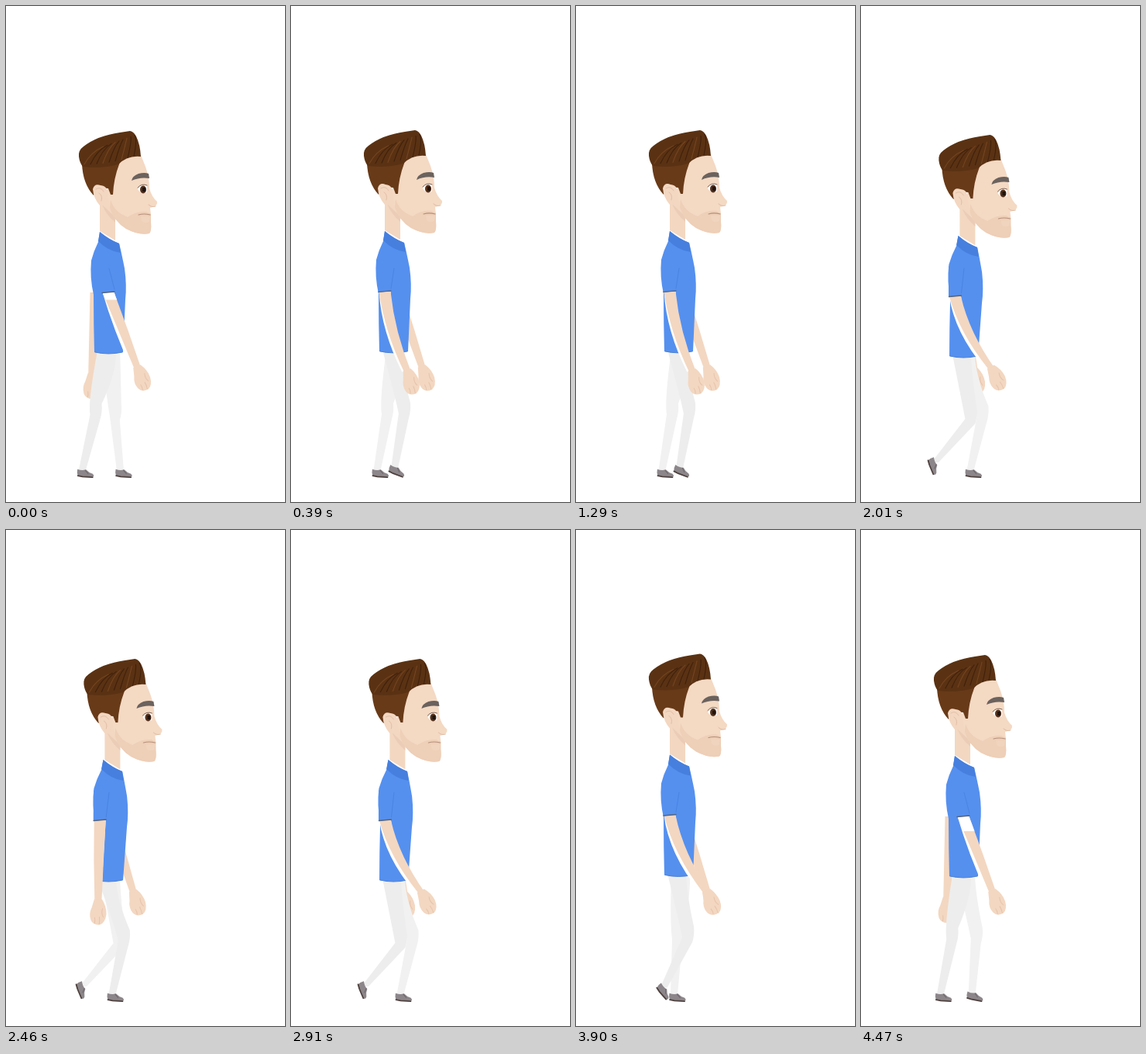
These frames come from a looping animation (360 by 639 pixels, 4500 ms). An HTML page with a canvas:

```html
<!DOCTYPE html>
<html lang="en">
<head>
<meta charset="utf-8">
<title>Walk cycle</title>
<style>
html, body { margin: 0; width: 100%; height: 100%; overflow: hidden; background: #fff; }
canvas { display: block; }
</style>
</head>
<body>
<canvas id="stage" width="360" height="639"></canvas>
<script>
const ctx = document.getElementById('stage').getContext('2d');
const STEP = 30, CYCLE = 900, HALF = CYCLE / 2;
const SKIN = '#f3d7c1', BLUE = '#5590ef', DARK_BLUE = '#467fde';

const mod = (t, period) => ((t % period) + period) % period;
const clamp = u => Math.min(1, Math.max(0, u));
const ease = u => (u = clamp(u), u * u * (3 - 2 * u));
const hump = u => Math.sin(Math.PI * clamp(u));

// Eases 0 to 1 between rise and top, and back to 0 between leave and end.
function pulse(t, period, rise, top, leave, end) {
  const s = mod(t - rise, period);
  return ease(s / (top - rise)) - ease((s - leave + rise) / (end - leave));
}

function bodyPose(t) {
  const lean = pulse(t, HALF, 0, 150, 215, 295);
  return { lean, bob: 5 * lean - 2 * hump((mod(t, HALF) - 255) / 165) };
}

// The foot rolls back on the ground, then lifts and swings forward.
function footPose(t) {
  const s = mod(t - 65, CYCLE), ground = 515;
  const turn = s < ground ? s / ground : 1 + (s - ground) / (CYCLE - ground);
  const swing = (mod(t, CYCLE) - 460) / 430;
  return {
    x: 122.5 + 29 * Math.cos(Math.PI * turn),
    y: 598 - 11 * hump(swing),
    angle: 3 + 66 * hump(clamp(swing) ** .7)
  };
}

function nearArmPose(t, bob) {
  const swing = pulse(t, CYCLE, 610, 860, 1190, 1450);
  const sleeve = pulse(t, CYCLE, 640, 880, 900, 1140);
  return {
    cx: 121 + 11 * sleeve, cy: 369 + bob,
    hx: 112 + 63 * swing, hy: 494 - 14 * swing,
    bow: 13 * swing * (1 - sleeve), gap: 4 * swing,
    bare: 48 * pulse(t, CYCLE, 680, 740, 750, 960)
  };
}

function farArmPose(t, bob) {
  const swing = pulse(t, CYCLE, 90, 300, 620, 850);
  return {
    cx: 116 + 20 * swing, cy: 369 + bob,
    hx: 110 + 64 * swing, hy: 490 - 10 * swing, bow: 0
  };
}

function fill(color, path) {
  ctx.fillStyle = color;
  ctx.fill(new Path2D(path));
}
function line(color, width, path) {
  ctx.strokeStyle = color;
  ctx.lineWidth = width;
  ctx.lineCap = 'round';
  ctx.stroke(new Path2D(path));
}
function placed(x, y, angle, draw) {
  ctx.save();
  ctx.translate(x, y);
  ctx.rotate(angle);
  draw();
  ctx.restore();
}

function shoe({ x, y, angle }) {
  placed(x, y, angle * Math.PI / 180, () => {
    fill('#8c868a', 'M-6 -1Q0 1 5 -1Q9 3 14 4Q17 7 14 8L-5 8Q-7 4 -6 -1Z');
    line('#4d403d', 1.8, 'M-5 7.5L1 8.3L14 8.4');
    line('#6c6469', 1, 'M4 0L8 4');
  });
}

// Two bones from hip to ankle, with the knee bent forward.
function leg(hipX, hipY, ankle, color) {
  const thigh = 68, shin = 78, { x, y } = ankle;
  const dx = x - hipX, dy = y - hipY;
  const d = Math.min(Math.hypot(dx, dy), thigh + shin);
  const bend = Math.acos((thigh * thigh + d * d - shin * shin) / (2 * thigh * d));
  const a = Math.atan2(dy, dx) - bend;
  const kx = hipX + thigh * Math.cos(a), ky = hipY + thigh * Math.sin(a);
  fill(color, `M${hipX - 12} ${hipY - 8}L${hipX + 12} ${hipY - 8}
    Q${hipX + 13} ${hipY + 20} ${kx + 8} ${ky - 6}Q${kx + 9} ${ky + 4} ${kx + 6} ${ky + 14}
    L${x + 4.5} ${y + 1}L${x - 4.5} ${y + 1}L${kx - 7} ${ky + 8}
    Q${kx - 10} ${ky - 8} ${hipX - 12} ${hipY - 8}Z`);
  shoe(ankle);
}

const armAngle = ({ cx, cy, hx, hy }) => Math.atan2(hy - cy, hx - cx);

function armPath(arm, shift = 0) {
  const { cx, cy, hx, hy, bow } = arm, a = armAngle(arm);
  const wx = hx - 14 * Math.cos(a) - shift, wy = hy - 14 * Math.sin(a);
  const mx = (cx + wx) / 2 - bow - shift, my = (cy + wy) / 2;
  return `M${cx - 7.5} ${cy}Q${mx - 6} ${my} ${wx - 4.5} ${wy}L${wx + 4.5} ${wy}
    Q${mx + 7} ${my} ${cx + 7.5} ${cy}Z`;
}

function drawArm(arm) {
  fill(SKIN, armPath(arm));
  placed(arm.hx, arm.hy, armAngle(arm) - Math.PI / 2, () => {
    fill(SKIN, 'M-5 -17L5 -17Q11 -8 11 2Q10 13 3 16Q-6 17 -9 10Q-12 2 -8 -6Z');
    line('#e5c3ab', 1, 'M-4 7Q-3 11 -4 14M2 6Q3 11 2 15M6 -5Q4 1 7 6');
  });
}

function drawNearArm(arm) {
  const { cx, cy, bare } = arm;
  fill('#fff', armPath(arm, arm.gap));
  drawArm(arm);
  ctx.save();
  ctx.beginPath();
  ctx.rect(0, cy, 360, bare);
  ctx.clip();
  fill('#fff', armPath(arm));
  ctx.restore();
  fill(BLUE, `M113 336Q123 322 133 336L${cx + 8.5} ${cy - 1}L${cx - 8.5} ${cy + 1}Z`);
  line('#53647f', 1.3, `M${cx - 8} ${cy + .5}L${cx + 8} ${cy - 1}`);
  line('#4a84e2', 1, `M133 338L${cx + 8} ${cy - 4}`);
}

function torso({ lean, bob }) {
  const k = lean * 4.3 / 150;
  ctx.save();
  ctx.transform(1, 0, -k, 1, 447 * k, bob);
  fill('#fff', 'M121 290L141 302L147 307L122 298Z');
  fill(BLUE, `M121 291Q133 301 146 306Q149 318 153 338Q156 360 154 378L151 446
    Q132 450 114 446Q113 410 113 372Q108 350 110 328Q113 316 119 304Z`);
  fill(DARK_BLUE, 'M121 291Q133 301 146 306L148 318Q132 316 119 303Z');
  line('#4d7fd0', 1, 'M115 446Q132 450 150 446');
  ctx.restore();
}

function hair() {
  fill('#683a18', 'M98 203Q99 229 113 244L119 234L132 235L135 243L138 243Q139 222 146 204L148 198L100 198Z');
  fill('#5a3213', `M94 194Q93 186 100 181Q118 167 147 163L160 161Q165 162 168 168
    Q173 178 174 194Q157 192 145 204Q124 210 99 207Q95 202 94 194Z`);
  for (let i = 0; i < 9; i++) {
    const x = 101 + 8 * i, root = 204 - .17 * i * i;
    const tipX = 126 + 5 * i, tipY = 181 - 1.8 * i;
    line(i % 3 ? '#40200c' : '#754520', 1.1,
      `M${x} ${root}Q${(x + tipX) / 2 + i - 4} ${tipY + 7} ${tipX} ${tipY}`);
  }
}

function head({ lean, bob }) {
  ctx.save();
  ctx.translate(6.4 * lean, bob);
  fill(SKIN, 'M121 237L121 293Q129 302 141 303L141 268L139 240Z');
  fill('#ebcdb7', 'M124 256L141 272L141 279Q130 270 124 256Z');
  fill('#f4d9c3', `M143 200Q158 191 174 192L180 207Q185 221 185 235
    Q188 246 195 252Q196 258 186 260L187 269Q185 273 187 279
    Q188 290 185 293Q172 296 155 287Q139 277 134 260L130 238Z`);
  fill('#eecfb7', `M135 250Q140 266 157 272Q168 264 181 265L187 268L187 279
    Q188 290 185 293Q172 296 155 287Q139 277 134 260Z`);
  fill('#f1d4bd', 'M174 271L186 271L185 278Q179 281 175 277Z');
  hair();
  fill(SKIN, 'M112 236Q114 228 122 231Q133 232 130 246Q128 259 121 257Q113 248 112 236Z');
  line('#e3bfa7', 1, 'M116 236Q122 232 126 239M120 241Q125 244 123 251');
  fill('#6b625e', 'M162 225Q163 219 171 216Q179 214 184 216L185 222Q173 220 162 225Z');
  fill('#fff', 'M170 236Q175 228 182 232L182 240Q174 243 170 236Z');
  ctx.beginPath();
  ctx.ellipse(177, 236.5, 4, 5, 0, 0, Math.PI * 2);
  ctx.fillStyle = '#54301b';
  ctx.fill();
  fill('#21130d', 'M176 234H180V239H176Z');
  line('#5d4a40', .8, 'M170 234Q175 228 182 231');
  line('#b58f7c', 1.1, 'M171 269Q178 267 186 269');
  line('#dfbaa2', 1, 'M184 256Q188 260 193 258');
  ctx.restore();
}

function draw(time) {
  const body = bodyPose(time), hipY = 452 + body.bob;
  const nearFoot = footPose(time + HALF);
  nearFoot.x -= 4;
  ctx.fillStyle = '#fff';
  ctx.fillRect(0, 0, 360, 639);
  drawArm(farArmPose(time, body.bob));
  leg(135, hipY, footPose(time), '#f1f1f1');
  leg(130, hipY, nearFoot, '#ededed');
  head(body);
  torso(body);
  drawNearArm(nearArmPose(time, body.bob));
}

function tick() {
  draw(Math.floor(performance.now() / STEP) * STEP % CYCLE);
  requestAnimationFrame(tick);
}
tick();
</script>
</body>
</html>
```
